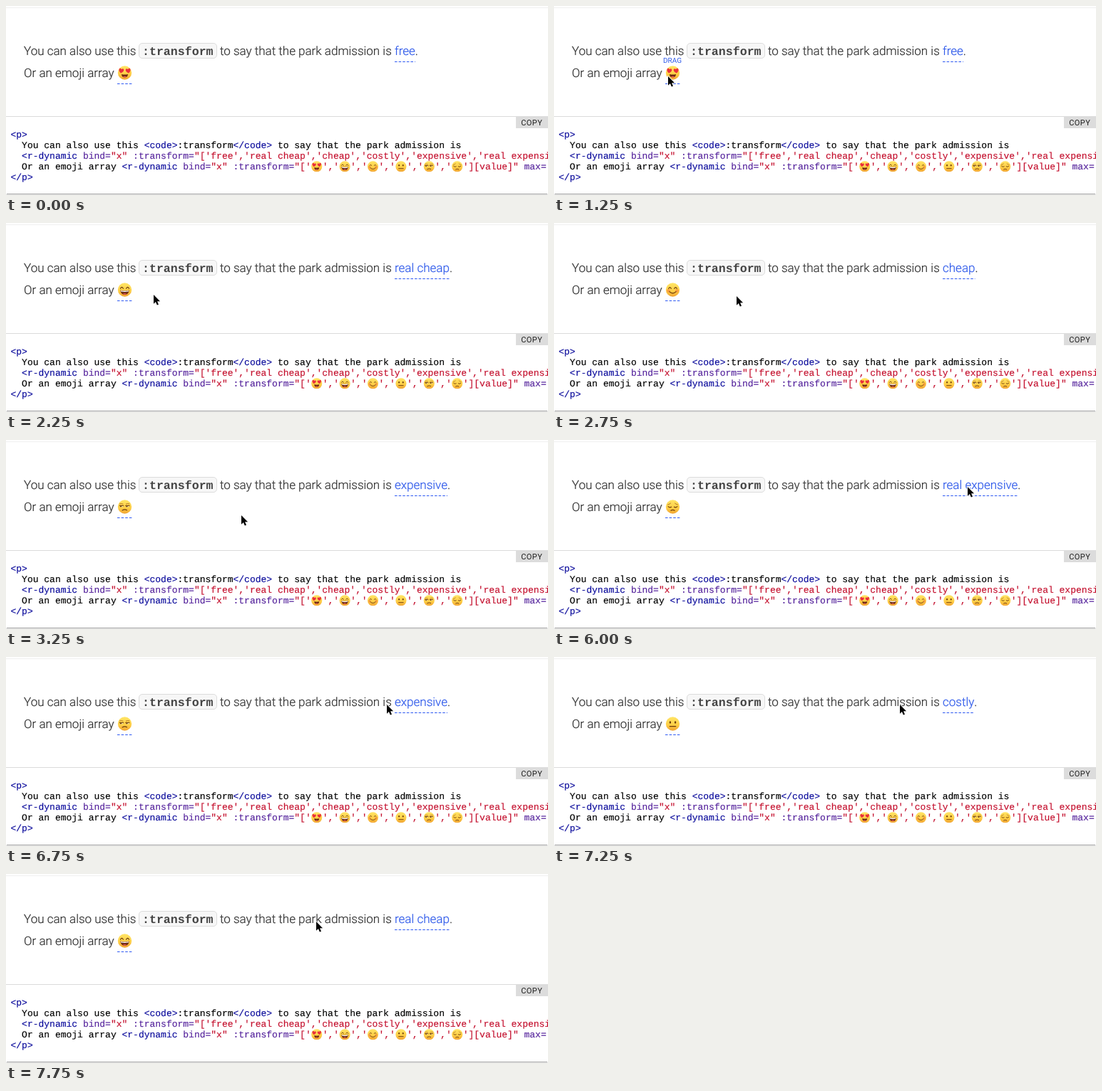
An HTML page that plays this animation: 760 px wide and 266 px high, repeating every 8 s.

```html
<!DOCTYPE html>
<html lang="en">
<head>
<meta charset="utf-8">
<title>Transform demo</title>
<style>
html, body { margin: 0; width: 100%; height: 100%; overflow: hidden; background: #fff; }
svg { display: block; }
text { white-space: pre; text-rendering: geometricPrecision; }
.prose { font: 300 17px Roboto, sans-serif; fill: #333; stroke: #333; stroke-width: .22; }
.link { fill: #2f5aea; stroke: #2f5aea; }
.chip { font: bold 16.6px "Liberation Mono", monospace; fill: #444; }
.drag { font: 10px Roboto, sans-serif; fill: #2f5aea; text-anchor: middle; }
.copy { font: 11px Roboto, sans-serif; letter-spacing: .4px; fill: #1c1c1c; }
.code { font: 13px "Liberation Mono", monospace; stroke-width: .15; }
.plain { fill: #000; stroke: #000; }
.tag { fill: #0c0c9c; stroke: #0c0c9c; }
.attr { fill: #55239c; stroke: #55239c; }
.str { fill: #c4102e; stroke: #c4102e; }
.dash { stroke: #2f5af2; stroke-width: 1; stroke-dasharray: 3.6 2; }
.line { fill: none; stroke: #6b3a0c; stroke-width: 1.2; stroke-linecap: round; }
.brow { fill: none; stroke: #a8661a; stroke-width: .9; stroke-linecap: round; }
</style>
</head>
<body>
<svg id="stage" width="760" height="266" viewBox="0 0 760 266">
  <defs>
    <linearGradient id="skin" x2="0" y2="1">
      <stop offset="0" stop-color="#ffe566"/>
      <stop offset=".6" stop-color="#fecd45"/>
      <stop offset="1" stop-color="#f0a332"/>
    </linearGradient>
    <circle id="head" cx="10" cy="10" r="9.7" fill="url(#skin)"/>
    <path id="heart" d="M0 3.6C-2.4 2-3.7.3-3.4-1.5C-3-3.4-.7-3.5 0-1.7C.7-3.5 3-3.4 3.4-1.5C3.7.3 2.4 2 0 3.6Z" fill="#ea2f3a"/>
    <symbol id="e0" viewBox="0 0 20 20" overflow="visible">
      <use href="#head"/>
      <use href="#heart" transform="translate(5.2 7) rotate(10)"/>
      <use href="#heart" transform="translate(14.8 7) rotate(-10)"/>
      <path d="M5.4 12Q10 13.2 14.6 12Q14 16.6 10 16.6Q6 16.6 5.4 12Z" fill="#6b2a10"/>
      <path d="M7.4 15.6Q10 13.9 12.6 15.6Q10 17.3 7.4 15.6Z" fill="#ee5a5a"/>
    </symbol>
    <symbol id="e1" viewBox="0 0 20 20" overflow="visible">
      <use href="#head"/>
      <path class="line" d="M4 8.2Q5.9 4.6 7.9 8.2M12.1 8.2Q14.1 4.6 16 8.2"/>
      <path d="M3.8 10.6Q10 11.8 16.2 10.6Q15.6 17 10 17Q4.4 17 3.8 10.6Z" fill="#6b2a10"/>
      <path d="M4.4 10.9Q10 11.9 15.6 10.9L15.2 12.6Q10 13.5 4.8 12.6Z" fill="#fff"/>
      <path d="M7 16Q10 14.2 13 16Q10 17.6 7 16Z" fill="#ee5a5a"/>
    </symbol>
    <symbol id="e2" viewBox="0 0 20 20" overflow="visible">
      <use href="#head"/>
      <g fill="#f47a3c" opacity=".55"><circle cx="4" cy="11.4" r="2.4"/><circle cx="16" cy="11.4" r="2.4"/></g>
      <path class="line" d="M4.2 8.3Q6 5 7.8 8.3M12.2 8.3Q14 5 15.8 8.3M5.4 12.6Q10 17.2 14.6 12.6"/>
    </symbol>
    <symbol id="e3" viewBox="0 0 20 20" overflow="visible">
      <use href="#head"/>
      <g fill="#6b3a0c"><ellipse cx="6.4" cy="8" rx="1.2" ry="1.7"/><ellipse cx="13.6" cy="8" rx="1.2" ry="1.7"/></g>
      <path class="line" d="M5.8 13.7H14.2"/>
    </symbol>
    <symbol id="e4" viewBox="0 0 20 20" overflow="visible">
      <use href="#head"/>
      <path d="M3 8.6H8Q7.6 10.4 5.5 10.4Q3.4 10.4 3 8.6ZM11.4 8.6H16.4Q16 10.4 13.9 10.4Q11.8 10.4 11.4 8.6Z" fill="#fff3d0"/>
      <g fill="#6b3a0c"><circle cx="4.6" cy="9.3" r="1.1"/><circle cx="13" cy="9.3" r="1.1"/></g>
      <path class="line" d="M2.8 8.5H8.2M11.2 8.5H16.6M6.6 14.9Q9.8 12.9 13 14.7"/>
      <path class="brow" d="M3 6Q5.4 5.2 7.6 6.2M11.8 6.2Q14 5.2 16.4 6"/>
    </symbol>
    <symbol id="e5" viewBox="0 0 20 20" overflow="visible">
      <use href="#head"/>
      <path class="line" d="M3.6 9.6Q5.6 11.6 8 10.2M12 10.2Q14.4 11.6 16.4 9.6M7.4 15.2Q10 13.7 12.6 15.2"/>
      <path class="brow" d="M3.2 7Q5.6 6.6 7 5M13 5Q14.4 6.6 16.8 7"/>
    </symbol>
  </defs>

  <rect width="760" height="266" fill="#fff"/>
  <rect y="2" width="760" height="1" fill="#efefef"/>

  <text class="prose" x="25" y="69">You can also use this</text>
  <rect x="186.5" y="52.5" width="109" height="21" rx="4.5" fill="#f7f7f7" stroke="#dcdcdc"/>
  <text class="chip" x="191" y="69">:transform</text>
  <text class="prose" x="300" y="69">to say that the park admission is</text>
  <text class="prose link" id="word" x="545" y="69"></text>
  <text class="prose" id="dot" y="69">.</text>
  <line class="dash" id="rule" x1="545" y1="78.5" y2="78.5"/>
  <text class="prose" x="25" y="100">Or an emoji array</text>
  <use id="face" x="156.5" y="84" width="20" height="20"/>
  <line class="dash" x1="156" x2="177" y1="109.5" y2="109.5"/>
  <text class="drag" id="label">DRAG</text>

  <rect y="155" width="760" height="1" fill="#dadada"/>
  <rect x="715" y="155" width="45" height="17" fill="#dcdcdc"/>
  <text class="copy" x="722.3" y="168">COPY</text>
  <g id="code"></g>
  <rect x="1" y="264" width="758" height="1" fill="#a9a9a9"/>
  <rect y="265" width="760" height="1" fill="#e6e6e6"/>

  <g id="cursor">
    <path transform="translate(1 1) scale(.88)" d="M0 0V14.6L3.3 11.5L5.5 16.6L7.9 15.6L5.8 10.6H10.3Z" fill="#000" stroke="#fff" stroke-width="2" stroke-linejoin="round" paint-order="stroke"/>
  </g>
</svg>
<script>
const NS = 'http://www.w3.org/2000/svg';
const $ = id => document.getElementById(id);
const LOOP = 8000, STEP = 250, UNIT = 43, CHAR = 7.8;
const words = ['free', 'real cheap', 'cheap', 'costly', 'expensive', 'real expensive'];

function add(name, attrs, text = '') {
  const el = document.createElementNS(NS, name);
  for (const key in attrs) el.setAttribute(key, attrs[key]);
  el.textContent = text;
  $('code').append(el);
}

// Each part is [class, text], or a face number.
function codeLine(row, indent, parts) {
  let x = 6.5 + indent * CHAR;
  const y = 185 + row * 15;
  for (const part of parts) {
    if (typeof part === 'number') {
      add('use', { href: '#e' + part, x: x + .2, y: y - 12, width: 15.6, height: 15.6 });
      x += 16;
    } else {
      add('text', { class: 'code ' + part[0], x, y }, part[1]);
      x += part[1].length * CHAR;
    }
  }
}

const tag = s => ['tag', s], attr = s => ['attr', s], str = s => ['str', s], plain = s => ['plain', s];
const open = [tag('<r-dynamic '), attr('bind='), str('"x" '), attr(':transform='), str('"[\'')];
const faces = words.flatMap((_, i) => i ? [str("','"), i] : [i]);

codeLine(0, 0, [tag('<p>')]);
codeLine(1, 2, [plain('You can also use this '), tag('<code>'), plain(':transform'), tag('</code>'),
  plain(' to say that the park admission is')]);
codeLine(2, 2, [...open, str(words.join("','") + "'][value]\"")]);
codeLine(3, 2, [plain('Or an emoji array '), ...open, ...faces, str("'][value]\" "), attr('max=')]);
codeLine(4, 0, [tag('</p>')]);

// Pointer stops: step, x, y
const stops = [
  [1, 352, 3], [2, 268, 40], [3, 196, 80], [4, 163, 97], [5, 159, 98],
  [7, 163, 98], [8, 181, 99], [9, 206, 100], [10, 235, 101], [11, 255, 102],
  [12, 292, 104], [13, 329, 105], [14, 347, 105], [15, 357, 106], [17, 361, 105],
  [19, 411, 90], [20, 576, 64], [21, 590, 65],
  [23, 587, 65], [24, 579, 65], [25, 565, 66], [26, 549, 66], [27, 533, 66],
  [28, 509, 66], [29, 484, 66], [30, 457, 66], [31, 434, 66]
];

function valueAt(step, x) {
  if (step < 7) return 0;
  const v = step < 20 ? (x - 159) / UNIT : 5 + (x - 590) / UNIT;
  return Math.max(0, Math.min(5, Math.round(v)));
}

function draw(step) {
  const stop = stops.filter(s => s[0] <= step).pop();
  const [, x, y] = stop || [0, 0, 0];
  const value = valueAt(step, x);
  $('cursor').setAttribute('visibility', stop ? 'visible' : 'hidden');
  $('cursor').setAttribute('transform', `translate(${x} ${y})`);

  $('word').textContent = words[value];
  const end = 545 + $('word').getComputedTextLength();
  $('dot').setAttribute('x', end);
  $('rule').setAttribute('x2', end);
  $('face').setAttribute('href', '#e' + value);

  const onFace = step >= 4 && step < 7, onWord = step >= 20 && step < 23;
  $('label').setAttribute('visibility', onFace || onWord ? 'visible' : 'hidden');
  $('label').setAttribute('x', onFace ? 166 : (545 + end) / 2);
  $('label').setAttribute('y', onFace ? 80 : 49);
}

const start = performance.now();
let last = -1;
function tick() {
  const step = Math.floor((performance.now() - start) % LOOP / STEP);
  if (step !== last) draw(last = step);
  requestAnimationFrame(tick);
}
tick();
</script>
</body>
</html>
```
